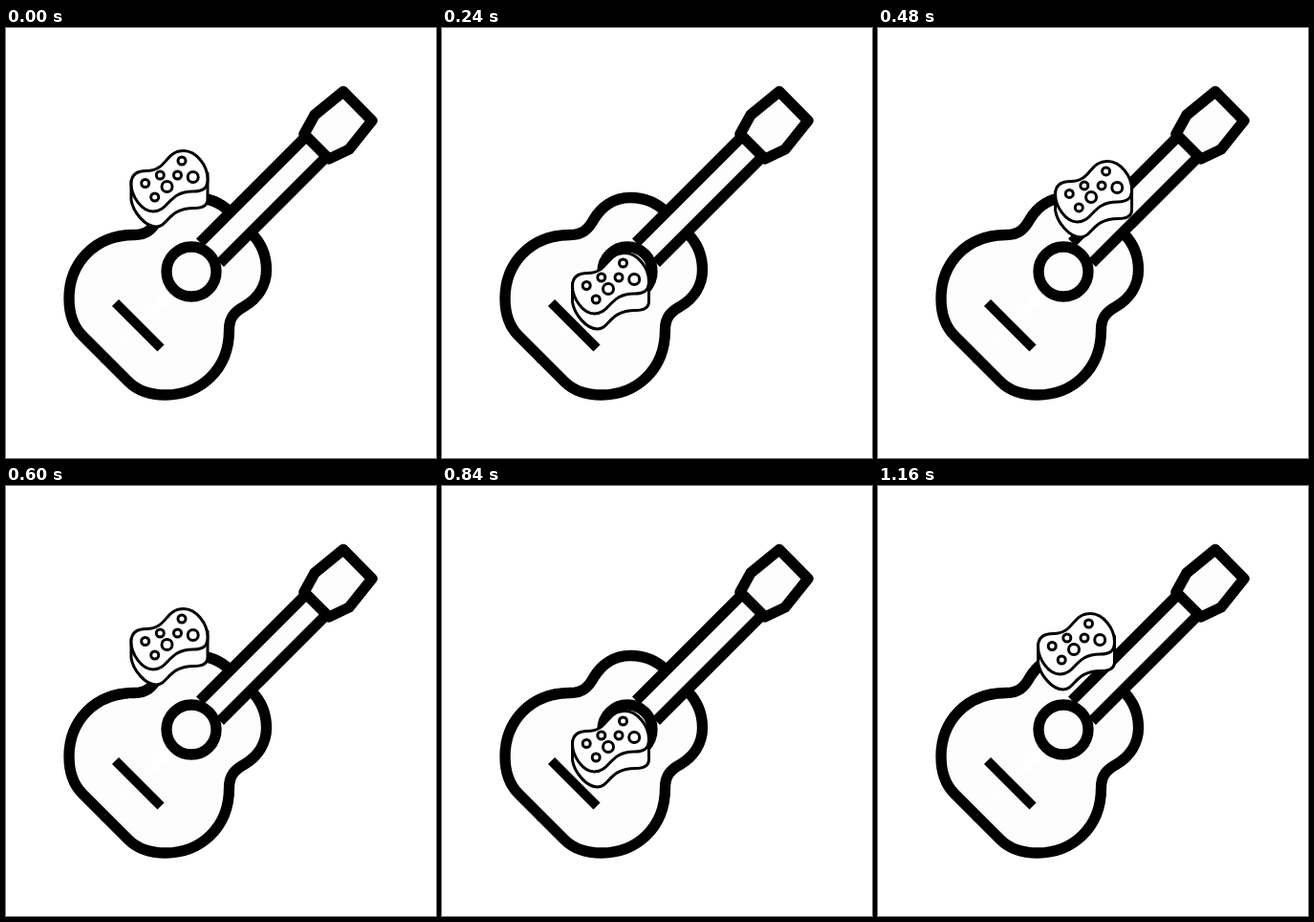
Recreate the animation shown at these times as an HTML page. Size 450 by 450 pixels, loop 1200 ms.

```html
<!DOCTYPE html>
<html lang="en">
<head>
<meta charset="utf-8">
<title>Guitar and sponge</title>
<style>
  html, body { margin: 0; height: 100%; overflow: hidden; background: #fff; }
  svg { display: block; width: 100%; height: 100%; }
  .guitar { fill: #fdfdfd; stroke: #000; stroke-width: 11.3; }
  .sponge { fill: #fff; stroke: #000; stroke-width: 3; stroke-linejoin: round; }
</style>
</head>
<body>
<svg viewBox="0 0 450 450">
  <g class="guitar">
    <path id="half" d="M235 193C224 182 210 177.5 197 177.5C180 177.5 167 187 159 200
      C153 211 147 216.500 134 216.500C92 216.500 66 247 66 283C66 300 71 313 80 322L105 347"/>
    <use href="#half" transform="matrix(0 -1 -1 0 450 450)"/>
    <path d="M203 224.500L314.500 113L336 134L224 246"/>
    <path d="M312 111L323 91L353 66.5L383 97L359 127L338 137Z" stroke-linejoin="round"/>
    <circle cx="194" cy="255" r="26"/>
    <path d="M114.500 287.500L162 335" stroke-width="10"/>
  </g>
  <g class="sponge" id="sponge">
    <path d="M131 160V180C133 193 146 208 157 208C170 208 169 188.500 197 188.500
      C206 188.500 211 186 211 179V152Z"/>
    <path d="M131 163C131 153 137 149.500 147 149.500C169 149.500 166 128.500 186 128.500
      C199 128.500 211 144 211 158C211 168 206 171 196 171C169 171 171 192 154 192
      C142 192 131 176 131 163Z"/>
    <g id="holes"></g>
  </g>
</svg>
<script>
  const sponge = document.getElementById("sponge");
  const addHoles = (r, ...spots) => {
    document.getElementById("holes").innerHTML +=
      spots.map(([x, y]) => `<circle cx="${x}" cy="${y}" r="${r}"/>`).join("");
  };
  addHoles(5.5, [168.5, 166], [195.7, 156]);
  addHoles(4, [145.7, 162.5], [161.3, 154], [184, 139], [179.5, 154], [155.7, 177]);

  const STEP = 40, STEPS = 15, TURN = 6, LAST = 14;
  const bezier = (a, b, c, d, u) => {
    const v = 1 - u;
    return a * v ** 3 + 3 * b * v * v * u + 3 * c * v * u * u + d * u ** 3;
  };

  // Down the left side, then up the right; the round restarts with a jump.
  function place(k) {
    if (k < TURN) {
      const u = k / TURN;
      return [bezier(0, -35, -35, 5.5, u), bezier(0, 20, 87, 107, u)];
    }
    const u = (k - TURN) / (LAST - TURN);
    return [bezier(5.5, 68, 70, 36.5, u), bezier(107, 72, -7, 5, u)];
  }

  function draw(now) {
    const [x, y] = place(Math.floor(now / STEP) % STEPS);
    sponge.setAttribute("transform", `translate(${x} ${y})`);
    requestAnimationFrame(draw);
  }
  draw(0);
</script>
</body>
</html>
```
